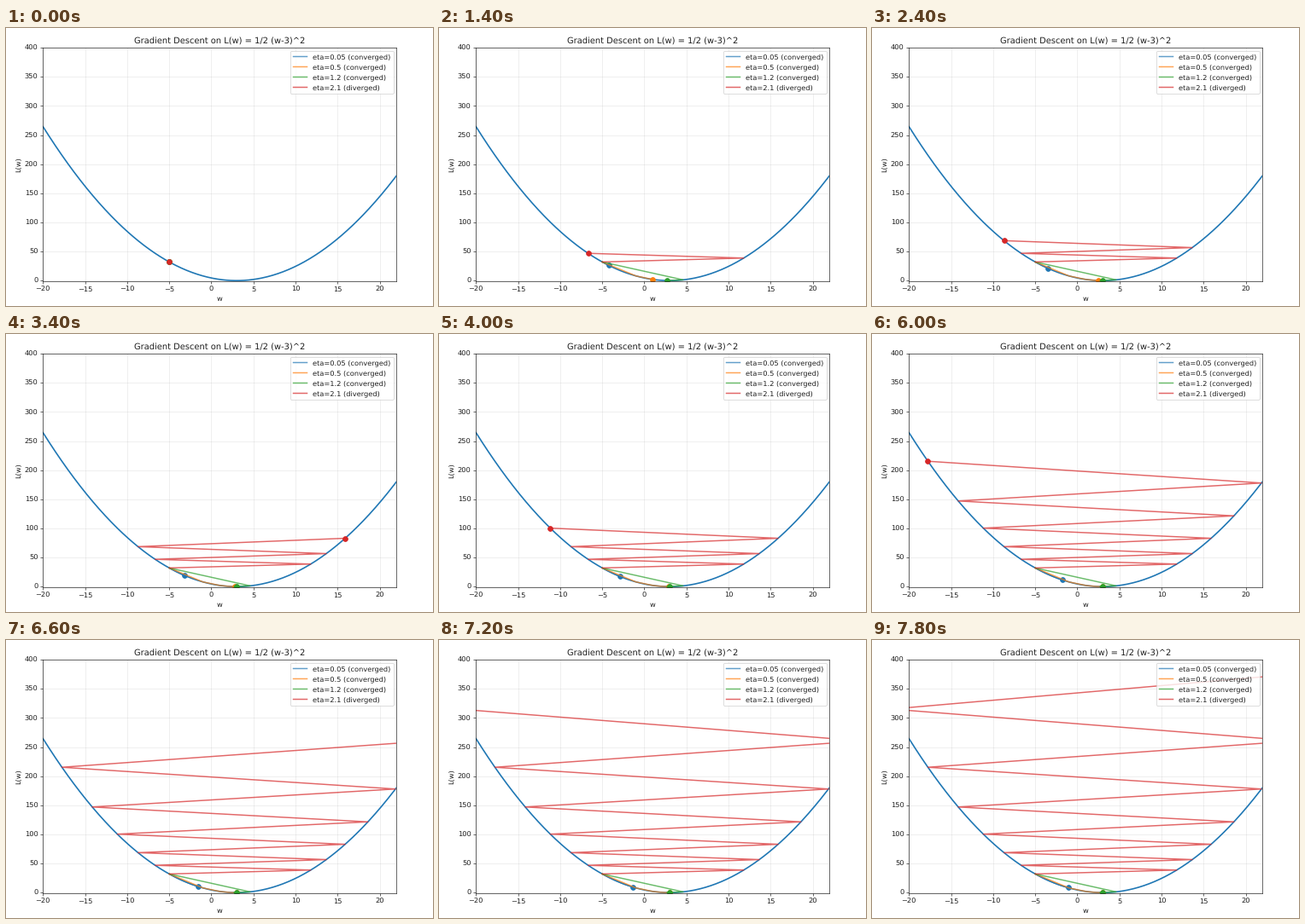
Write a matplotlib script that moves like this. It is 500 by 326 pixels and loops after 8 s.

```python
import numpy as np
import matplotlib.pyplot as plt
from matplotlib.animation import FuncAnimation

WIDTH, HEIGHT, DPI = 500, 326, 59.5
FRAMES, INTERVAL = 40, 200
FRAMES_PER_STEP = 3
START, MINIMUM = -5.0, 3.0
RUNS = [
    (0.05, "converged", "tab:blue"),
    (0.5, "converged", "tab:orange"),
    (1.2, "converged", "tab:green"),
    (2.1, "diverged", "tab:red"),
]
INK = "0.12"


def loss(w):
    return 0.5 * (w - MINIMUM) ** 2


def descend(eta, steps):
    """Positions of gradient descent, from the start through the given step."""
    return MINIMUM + (START - MINIMUM) * (1 - eta) ** np.arange(steps + 1)


plt.rcParams.update({
    "font.family": "DejaVu Sans",
    "text.hinting": "none",
    "text.color": INK,
    "axes.labelcolor": INK,
    "axes.edgecolor": INK,
    "xtick.color": INK,
    "ytick.color": INK,
})
fig = plt.figure(figsize=((WIDTH + 1e-4) / DPI, (HEIGHT + 1e-4) / DPI), dpi=DPI)
left, right, top, bottom = 43.3, 457.4, 23.1, 296.9
ax = fig.add_axes([left / WIDTH, 1 - bottom / HEIGHT,
                   (right - left) / WIDTH, (bottom - top) / HEIGHT])
ax.set(xlim=(-20, 22), ylim=(-1, 400), xlabel="w", ylabel="L(w)",
       title="Gradient Descent on L(w) = 1/2 (w-3)^2")
ax.yaxis.labelpad = 3
ax.grid(alpha=0.3)

w_axis = np.linspace(-20, 22, 400)
ax.plot(w_axis, loss(w_axis), color="tab:blue", lw=2)

trails, dots = [], []
for eta, outcome, color in RUNS:
    trails += ax.plot([], [], color=color, lw=1.8, alpha=0.7,
                      label=f"eta={eta} ({outcome})")
    dots += ax.plot([], [], "o", color=color, ms=7)
ax.legend(loc="upper right", borderaxespad=0.45)


def update(frame):
    step = frame // FRAMES_PER_STEP
    for (eta, _, _), trail, dot in zip(RUNS, trails, dots):
        w = descend(eta, step)
        trail.set_data(w, loss(w))
        dot.set_data(w[-1:], loss(w[-1:]))
    return trails + dots


animation = FuncAnimation(fig, update, frames=FRAMES, interval=INTERVAL,
                          init_func=lambda: update(0), repeat=True, repeat_delay=0)
plt.show()
```
